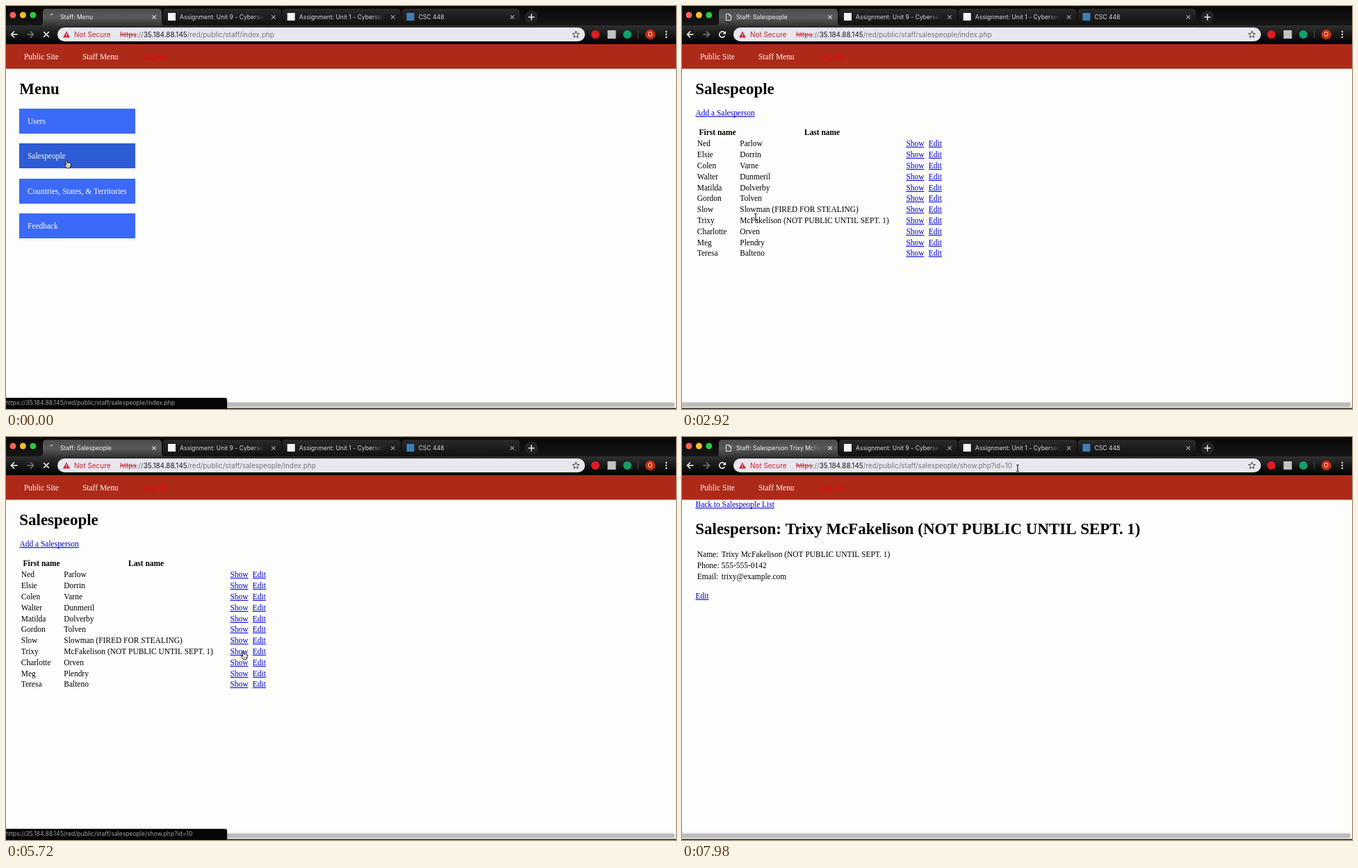
Animation, 964 px wide and 581 px high, one loop 8 s. Source, as an HTML page with a canvas:

```html
<!DOCTYPE html>
<html lang="en">
<head>
<meta charset="utf-8">
<title>Staff area</title>
<style>
html, body { margin: 0; width: 100%; height: 100%; overflow: hidden; background: #fdfdfb; }
canvas { display: block; }
</style>
</head>
<body>
<canvas id="stage" width="964" height="581"></canvas>
<script>
const ctx = document.getElementById('stage').getContext('2d');
const LOOP = 8000, LIST_AT = 1060, STATUS_AT = 5100, CLICK_AT = 5450, DETAIL_AT = 6200;
const SANS = 'Inter, Roboto, sans-serif';
const SERIF = '"Liberation Serif", serif';
const BODY = `11.45px ${SERIF}`, BOLD = `bold 11.45px ${SERIF}`, HEAD = `bold 22.95px ${SERIF}`;
const TAB = `8.6px ${SANS}`, URL_FONT = `9.93px ${SANS}`;
const HOST = '35.184.88.145', ROOT = '/red/public/staff/';
const NOTE = '(NOT PUBLIC UNTIL SEPT. 1)';
const PEOPLE = [
  ['Ned', 'Parlow'], ['Elsie', 'Dorrin'], ['Colen', 'Varne'], ['Walter', 'Dunmeril'],
  ['Matilda', 'Dolverby'], ['Gordon', 'Tolven'], ['Slow', 'Slowman (FIRED FOR STEALING)'],
  ['Trixy', 'McFakelison ' + NOTE], ['Charlotte', 'Orven'], ['Meg', 'Plendry'], ['Teresa', 'Balteno']
];
// time, x, y of the pointer's centre
const PATH = [
  [0, 89, 228], [900, 89, 228], [1400, 92, 232], [1900, 93, 237], [2920, 106, 304],
  [3500, 112, 306], [4640, 334, 311], [5000, 343, 315], [6250, 343, 315],
  [6600, 407, 72], [7000, 425, 66], [7800, 483, 45], [8000, 483, 45]
];

const clamp = v => Math.max(0, Math.min(1, v));

function vertical(y0, y1, ...colors) {
  const g = ctx.createLinearGradient(0, y0, 0, y1);
  colors.forEach((c, i) => g.addColorStop(i / (colors.length - 1), c));
  return g;
}
function rect(x, y, w, h, fill) {
  ctx.fillStyle = fill;
  ctx.fillRect(x, y, w, h);
}
function round(x, y, w, h, r, fill) {
  ctx.fillStyle = fill;
  ctx.beginPath();
  ctx.roundRect(x, y, w, h, r);
  ctx.fill();
}
function disc(x, y, r, fill) {
  ctx.fillStyle = fill;
  ctx.beginPath();
  ctx.arc(x, y, r, 0, 7);
  ctx.fill();
}
function line(points, color, width = 1.3) {
  ctx.strokeStyle = color;
  ctx.lineWidth = width;
  ctx.beginPath();
  points.forEach(([x, y]) => ctx.lineTo(x, y));
  ctx.stroke();
}
function poly(points, fill, stroke, width = 1) {
  ctx.beginPath();
  points.forEach(([x, y]) => ctx.lineTo(x, y));
  ctx.closePath();
  ctx.fillStyle = fill;
  ctx.fill();
  if (!stroke) return;
  ctx.strokeStyle = stroke;
  ctx.lineWidth = width;
  ctx.stroke();
}
function text(str, x, y, font, color) {
  ctx.font = font;
  ctx.fillStyle = color;
  ctx.fillText(str, x, y);
  return ctx.measureText(str).width;
}
function link(str, x, y) {
  const w = text(str, x, y, BODY, '#0000d8');
  rect(x, Math.round(y + 1), w, 1, '#0000d8');
}
function cross(x, y, r, color, width) {
  line([[x - r, y - r], [x + r, y + r]], color, width);
  line([[x - r, y + r], [x + r, y - r]], color, width);
}

function tabTitle(str, x, end, color) {
  const g = ctx.createLinearGradient(end - 20, 0, end, 0);
  g.addColorStop(0, color);
  g.addColorStop(1, 'rgba(60,60,60,0)');
  ctx.save();
  ctx.beginPath();
  ctx.rect(x, 5, end - x, 22);
  ctx.clip();
  text(str, x, 19, TAB, g);
  ctx.restore();
}
function tabShape(x, w, fill) {
  ctx.fillStyle = fill;
  ctx.beginPath();
  ctx.moveTo(x - 4, 28);
  ctx.quadraticCurveTo(x, 28, x, 23);
  ctx.lineTo(x, 9);
  ctx.quadraticCurveTo(x, 4, x + 5, 4);
  ctx.lineTo(x + w - 5, 4);
  ctx.quadraticCurveTo(x + w, 4, x + w, 9);
  ctx.lineTo(x + w, 23);
  ctx.quadraticCurveTo(x + w, 28, x + w + 4, 28);
  ctx.fill();
}

function drawTabs(t, title, loading) {
  rect(0, 0, 964, 28, vertical(0, 28, '#080808', '#161616'));
  ['#ff5f57', '#febc2e', '#28c840'].forEach((c, i) => disc(10 + 14.4 * i, 13, 4.5, c));
  const others = [
    ['Assignment: Unit 9 - Cybersecurity', '#f4f4f4'],
    ['Assignment: Unit 1 - Cybersecurity', '#f4f4f4'],
    ['CSC 448', '#3f7fb5']
  ];
  others.forEach(([name, icon], i) => {
    const x = 226 + 171.7 * i;
    tabShape(x, 170, vertical(4, 28, '#2a2a2a', '#101010'));
    rect(x + 7, 10, 11, 11, icon);
    tabTitle(name, x + 24, x + 150, '#d8d8d8');
    cross(x + 159, 16, 2.7, '#aaa', 1.1);
  });
  tabShape(53, 171, vertical(4, 28, '#4c4c4c', '#5a5a5a', '#363636'));
  tabTitle(title, 78, 204, '#eee');
  cross(213, 16, 2.7, '#ddd', 1.1);
  if (loading) {
    const a = -Math.PI / 2 - t / 1430 * Math.PI * 2;
    ctx.strokeStyle = '#ddd';
    ctx.lineWidth = 1.3;
    ctx.beginPath();
    ctx.arc(67, 16, 4.2, a - 0.7, a + 0.1);
    ctx.stroke();
  } else {
    line([[68, 11.5], [63.5, 11.5], [63.5, 20.5], [70.5, 20.5], [70.5, 14], [68, 11.5], [68, 14], [70.5, 14]], '#eee', 1);
  }
  disc(756, 16, 9.5, '#222');
  line([[751.5, 16], [760.5, 16]], '#eee', 1.5);
  line([[756, 11.5], [756, 20.5]], '#eee', 1.5);
}

function arrow(x, dir, color) {
  line([[x - 4.5 * dir, 41], [x + 4.5 * dir, 41]], color, 1.5);
  line([[x, 36.5], [x + 4.5 * dir, 41], [x, 45.5]], color, 1.5);
}

function drawToolbar(path, loading) {
  rect(0, 28, 964, 27, vertical(28, 55, '#303030', '#171717', '#000'));
  arrow(12, -1, '#fff');
  arrow(35, 1, '#777');
  if (loading) {
    cross(58, 41, 3.8, '#fff', 1.5);
  } else {
    ctx.strokeStyle = '#fff';
    ctx.lineWidth = 1.5;
    ctx.beginPath();
    ctx.arc(58, 41, 4.2, 0.5, 5.5);
    ctx.stroke();
    poly([[63, 36], [63, 40.5], [58.5, 40.5]], '#fff');
  }
  round(74, 31, 759, 20, 10, '#e8e6ee');
  poly([[87, 36.5], [92, 45.5], [82, 45.5]], '#c9252d');
  rect(86.5, 39.5, 1, 3, '#fff');
  rect(86.5, 43.3, 1, 1, '#fff');
  text('Not Secure', 98, 44.7, URL_FONT, '#c9252d');
  let x = 164;
  const w = text('https', x, 44.7, URL_FONT, '#c9252d');
  rect(x, 41, w, 1, '#c9252d');
  x += w;
  x += text('://', x, 44.7, URL_FONT, '#77757c');
  x += text(HOST, x, 44.7, URL_FONT, '#1c1c20');
  text(path, x, 44.7, URL_FONT, '#77757c');

  const star = Array.from({ length: 10 }, (_, i) => {
    const a = -Math.PI / 2 + i * Math.PI / 5, r = i % 2 ? 2.3 : 5.2;
    return [820 + r * Math.cos(a), 41.3 + r * Math.sin(a)];
  });
  poly(star, '#e8e6ee', '#444', 1);
  disc(848, 41, 6, '#e01b22');
  rect(865.5, 35, 12, 12, '#c2c2c2');
  disc(894, 41, 6, '#12a06a');
  rect(909, 35, 1, 12, '#444');
  disc(927, 41, 7.2, '#c6300f');
  text('O', 923.6, 44.2, `8.6px ${SANS}`, '#fff');
  for (const y of [37, 41, 45]) disc(950, y, 1.2, '#fff');
}

function drawNav() {
  rect(0, 55, 964, 35.5, '#ad2a19');
  text('Public Site', 26, 77, BODY, '#fff');
  text('Staff Menu', 110, 77, BODY, '#fff');
  text('Log out', 197, 77, BODY, '#ea0808');
}

function drawMenu() {
  text('Menu', 19.3, 127, HEAD, '#000');
  ['Users', 'Salespeople', 'Countries, States, & Territories', 'Feedback'].forEach((name, i) => {
    const y = 148 + 50.3 * i;
    rect(19, Math.round(y), 167, 36, i === 1 ? '#2d5cd6' : '#3b69f8');
    text(name, 31, y + 22, BODY, '#fff');
  });
}

function drawList() {
  text('Salespeople', 19.3, 127, HEAD, '#000');
  link('Add a Salesperson', 19.5, 158.3);
  text('First name', 24.6, 186.3, BOLD, '#000');
  text('Last name', 176, 186.3, BOLD, '#000');
  PEOPLE.forEach(([first, last], i) => {
    const y = 202.3 + 15.8 * i;
    text(first, 21.8, y, BODY, '#000');
    text(last, 83.3, y, BODY, '#000');
    link('Show', 322.4, y);
    link('Edit', 354.8, y);
  });
}

function drawDetail() {
  const name = PEOPLE[7].join(' ');
  link('Back to Salespeople List', 19.5, 101);
  text('Salesperson: ' + name, 19.3, 139.6, HEAD, '#000');
  [['Name:', name], ['Phone:', '555-555-0142'], ['Email:', 'trixy@example.com']].forEach(([label, value], i) => {
    const y = 173.3 + 15.8 * i;
    text(label, 21.8, y, BODY, '#000');
    text(value, 56.8, y, BODY, '#000');
  });
  link('Edit', 19.5, 233);
}

function drawBottom(alpha, path) {
  rect(0, 569, 964, 12, '#f6f6f4');
  round(-6, 571.5, 968, 6.5, 3, '#bcbcbc');
  rect(0, 579.5, 964, 1.5, '#2a2a2a');
  if (alpha <= 0) return;
  ctx.save();
  ctx.globalAlpha = alpha;
  ctx.shadowColor = 'rgba(0,0,0,.35)';
  ctx.shadowBlur = 3;
  round(-6, 565, 324, 20, 3, '#060606');
  ctx.shadowBlur = 0;
  text('https://' + HOST + path, -1, 575.3, TAB, '#a0a0a0');
  ctx.restore();
}

function pointerAt(t) {
  const i = Math.max(1, PATH.findIndex(k => k[0] > t));
  const [t0, x0, y0] = PATH[i - 1], [t1, x1, y1] = PATH[i];
  const u = (t - t0) / (t1 - t0), e = u * u * (3 - 2 * u);
  return [x0 + (x1 - x0) * e, y0 + (y1 - y0) * e];
}
function drawHand() {
  poly([[-2.8, -5.2], [-1.4, -5.2], [-0.5, -1.6], [1, -2], [2.4, -1.4], [3.8, -1], [4.4, 0.4],
    [4, 3], [3, 5.6], [-1.6, 5.6], [-4.6, 1.6], [-4.4, 0.4], [-2.2, 1.2], [-3.2, -4]], '#fff', '#111', 1);
  for (const x of [-0.5, 1.2, 2.9]) line([[x, 1.8], [x, 3.8]], '#333', 0.7);
}
function drawArrow() {
  poly([[-3.5, -6], [-3.5, 4.2], [-1.2, 2.2], [0.6, 6], [2, 5.4], [0.4, 1.7], [3.6, 1.5]], '#000', '#fff', 0.8);
}
function drawBeam() {
  line([[0, -4], [0, 4]], '#111', 1.1);
  line([[-2, -5], [0, -4], [2, -5]], '#111', 1);
  line([[-2, 5], [0, 4], [2, 5]], '#111', 1);
}
function drawPointer(t) {
  const [x, y] = pointerAt(t);
  const onLink = t < LIST_AT || (t < DETAIL_AT && x > 322);
  const onText = y < 53 || (t < DETAIL_AT && x < 301);
  ctx.save();
  ctx.translate(x, y);
  if (onLink) drawHand();
  else if (onText) drawBeam();
  else drawArrow();
  ctx.restore();
}

function draw(t) {
  const loading = t < LIST_AT || (t >= CLICK_AT && t < DETAIL_AT);
  const list = ROOT + 'salespeople/index.php', detail = ROOT + 'salespeople/show.php?id=10';
  let title = 'Staff: Menu', path = ROOT + 'index.php', page = drawMenu;
  if (t >= DETAIL_AT) {
    title = 'Staff: Salesperson ' + PEOPLE[7].join(' ');
    path = detail;
    page = drawDetail;
  } else if (t >= LIST_AT) {
    title = 'Staff: Salespeople';
    path = list;
    page = drawList;
  }
  const early = t < STATUS_AT;
  const alpha = early
    ? 1 - clamp((t - 1310) / 200)
    : clamp((t - STATUS_AT) / 120) * (1 - clamp((t - 6570) / 200));

  rect(0, 0, 964, 581, '#fdfdfb');
  drawTabs(t, title, loading);
  drawToolbar(path, loading);
  drawNav();
  page();
  drawBottom(alpha, early ? list : detail);
  drawPointer(t);
}

function tick(now) {
  draw(now % LOOP);
  requestAnimationFrame(tick);
}
draw(0);
requestAnimationFrame(tick);
</script>
</body>
</html>
```
